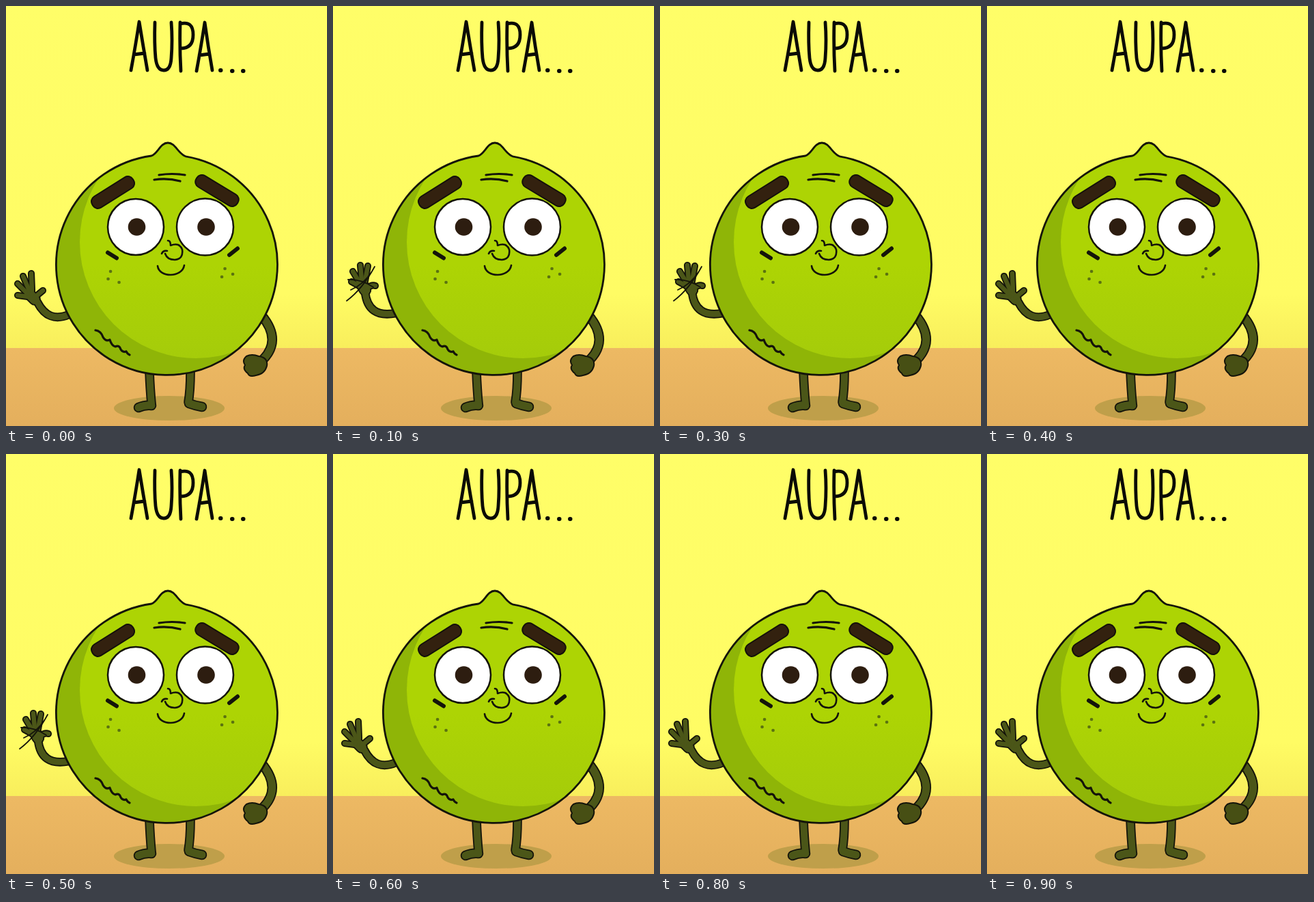
An HTML page for the animation above (1000 ms loop, 470 by 614 pixels).

```html
<!DOCTYPE html>
<html lang="es">
<head>
<meta charset="utf-8">
<title>AUPA...</title>
<style>
  html, body { margin: 0; width: 100%; height: 100%; overflow: hidden; }
  svg { display: block; width: 100vw; height: 100vh; }
  .line { fill: none; stroke: #14140a; stroke-linecap: round; stroke-linejoin: round; }
</style>
</head>
<body>
<svg viewBox="0 0 470 614" preserveAspectRatio="none">
  <defs>
    <linearGradient id="wall" x2="0" y2="1">
      <stop offset="0" stop-color="#fffe68"/>
      <stop offset=".84" stop-color="#fffc64"/>
      <stop offset="1" stop-color="#f8ee5c"/>
    </linearGradient>
    <linearGradient id="floor" x2="0" y2="1">
      <stop offset="0" stop-color="#edb963"/>
      <stop offset="1" stop-color="#e4af5d"/>
    </linearGradient>
    <linearGradient id="skin" x2="0" y2="1">
      <stop offset=".6" stop-color="#add404"/>
      <stop offset="1" stop-color="#a5cc0a"/>
    </linearGradient>
    <path id="body" d="M213 219C222 216 226 200 237 200S252 216 263 219.800A162 161 0 1 1 213 219Z"/>
    <clipPath id="inside"><use href="#body"/></clipPath>
  </defs>

  <rect width="470" height="501" fill="url(#wall)"/>
  <rect y="500" width="470" height="114" fill="url(#floor)"/>
  <ellipse cx="239" cy="588" rx="81" ry="18" fill="#bf9f4a"/>

  <!-- hand-lettered greeting -->
  <g class="line" stroke-width="4.800" style="stroke:#0b0b06" role="img" aria-label="AUPA...">
    <path d="M183 94Q190 56 195 23Q201 60 207 94M187 71L203 69"/>
    <path d="M218 24Q217 55 219 76Q221 94 231 94T242 76Q244 50 242 24"/>
    <path d="M255 24Q254 60 256 95M255 26Q274 21 274 42Q274 62 256 62"/>
    <path d="M279 95Q286 57 291 24Q296 60 302 94M283 72L298 70"/>
    <path d="M314 94h.5M331 95h.5M347 95h.5" stroke-width="6"/>
  </g>

  <g id="limbs"></g>
  <g id="rest"></g>
  <g id="wave">
    <path id="swish" class="line" stroke-width="1.800" d="M20 431Q43 414 61 381M22 400Q41 399 59 411M26 415Q45 407 57 388"/>
  </g>

  <use href="#body" fill="#8fb507"/>
  <circle cx="278" cy="345" r="170" clip-path="url(#inside)" fill="url(#skin)"/>
  <use href="#body" class="line" stroke-width="2.800"/>

  <g fill="#33210f" stroke="#14100a" stroke-width="2">
    <rect x="-35" y="-9.500" width="70" height="19" rx="8.500" transform="translate(156.500 272.500) rotate(-32)"/>
    <rect x="-35" y="-9.500" width="70" height="19" rx="8.500" transform="translate(309 270) rotate(31)"/>
  </g>
  <g fill="#fff" stroke="#14140a" stroke-width="2.500">
    <circle cx="190" cy="323" r="41"/>
    <circle cx="291.500" cy="323" r="41.500"/>
  </g>
  <g fill="#2d1d10">
    <circle cx="191.500" cy="323" r="12.800"/>
    <circle cx="293" cy="323" r="12.800"/>
  </g>

  <g class="line" stroke-width="2.600">
    <path d="M224 247Q243 244 262 247M217 254Q236 251 255 256" stroke-width="3.200"/>
    <path d="M237 343Q241 343 241 350Q254 345 258 356Q260 370 247 371Q236 371 233 362M228 362Q230 357 236 358"/>
    <path d="M222 380C224 397.500 258 397.500 261 379"/>
    <path d="M149 360.500L162 368.500M327 364L339 354.500" stroke-width="6"/>
    <path d="M131 474Q139 475 142 484Q146 491 152 488Q155 497 160 498Q166 495 168 502Q171 507 176 505Q178 509 181 510" stroke-width="3.200"/>
    <path d="M153 388h.1M149.500 399h.1M165.500 404h.1M320.500 384h.1M316 396h.1M332 392h.1" stroke-width="4.600" style="stroke:#5b7310"/>
  </g>
</svg>
<script>
const $ = id => document.getElementById(id);

// Each part is [path, width]; outlines lie under all the fills.
function limb(parts) {
  const strokes = (color, extra) => parts.map(([d, w]) =>
    `<path class="line" d="${d}" stroke-width="${w + extra}" style="stroke:${color}"/>`).join('');
  return strokes('#14140a', 3.6) + strokes('#4b5618', 0);
}

$('limbs').innerHTML =
  limb([
    ['M210 535Q211 560 213 581', 10],
    ['M213 584Q203 583 194 587', 11],
    ['M270 535Q270 562 267 579', 10],
    ['M268 581Q276 584 287 586', 11],
    ['M374 452Q406 490 373 520', 11]
  ]) +
  `<path class="line" stroke-width="2" style="fill:#474f14"
    d="M352 512Q360 508 370 512Q384 514 382 526Q379 538 366 540Q356 543 354 537Q346 531 350 525Q345 518 352 512Z"/>`;

$('rest').innerHTML = limb([
  ['M92 451Q62 464 46 433', 9],
  ['M34 421L42 429', 14],
  ['M32 425L17 423', 6.5],
  ['M31 420L17 406', 6.5],
  ['M34 416L25 395', 6.5],
  ['M38 416L37 391', 6.5],
  ['M42 426Q49 420 54 416', 6.5]
]);

$('swish').insertAdjacentHTML('beforebegin', limb([
  ['M92 449Q51 457 47 418', 9],
  ['M42 406L47 415', 15],
  ['M38 409L27 403', 6.5],
  ['M38 403L29 388', 6.5],
  ['M42 401L40 379', 6.5],
  ['M47 402L51 380', 6.5],
  ['M50 412Q57 407 62 409', 6.5]
]));

function draw() {
  const step = Math.floor(performance.now() % 1000 / 100);
  const waving = step % 2 === 1 && step < 9;
  $('wave').style.display = waving ? '' : 'none';
  $('rest').style.display = waving ? 'none' : '';
  requestAnimationFrame(draw);
}
draw();
</script>
</body>
</html>
```
